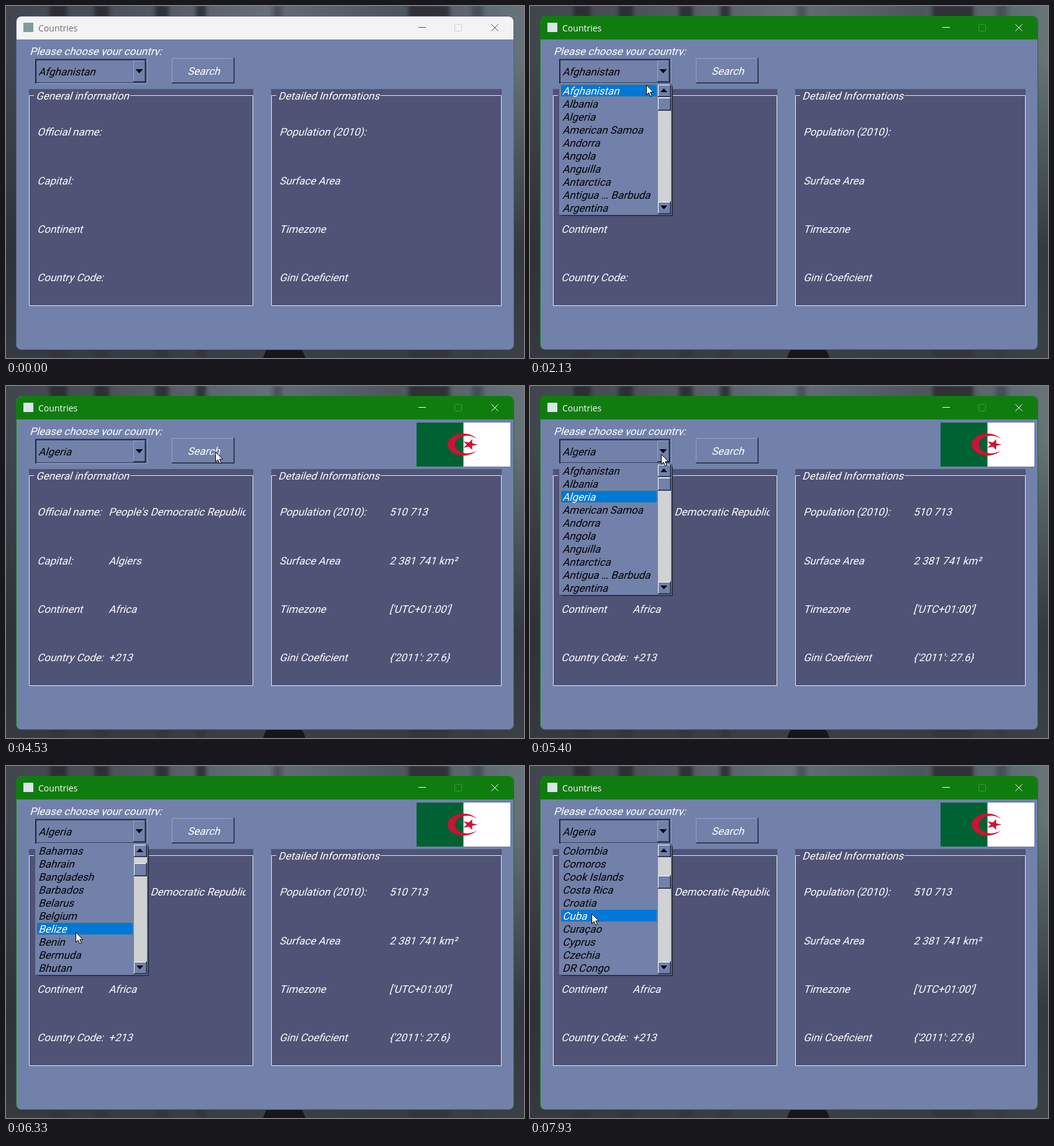
Write an HTML page that moves like this. It is 834 by 568 pixels and loops after 8 s.

```html
<!DOCTYPE html>
<html lang="en">
<head>
<meta charset="utf-8">
<title>Countries</title>
<style>
  html, body { margin: 0; width: 100%; height: 100%; overflow: hidden; background: #3a3d45; }
  svg { display: block; width: 834px; height: 568px; }
  text { font: 17px Roboto, sans-serif; fill: #fff; white-space: pre; }
  .dark { fill: #000; }
  .caption { font: 14px "Open Sans", "Noto Sans", sans-serif; fill: var(--title); }
  #app { --bar: #f3f3f3; --title: #6f6f6f; --control: #555; --off: #cfcfcf; --edge: #5a6180; --icon: #7f9c9d; }
  #app.active { --bar: #107c10; --title: #fff; --control: #fff; --off: #409640; --edge: #107c10; --icon: #dce6ea; }
  .line { fill: none; stroke-width: 1; }
</style>
</head>
<body>
<svg id="app" viewBox="0 0 834 568">
  <defs>
    <linearGradient id="fog">
      <stop offset="0" stop-color="#41454d"/><stop offset=".2" stop-color="#4b5159"/>
      <stop offset=".5" stop-color="#656f78"/><stop offset=".75" stop-color="#4d555d"/>
      <stop offset="1" stop-color="#66747a"/>
    </linearGradient>
    <linearGradient id="ground" x2="0" y2="1">
      <stop offset=".15" stop-color="#2c2e35" stop-opacity="0"/>
      <stop offset=".7" stop-color="#2c2e35" stop-opacity=".85"/>
      <stop offset="1" stop-color="#34373d" stop-opacity=".85"/>
    </linearGradient>
    <filter id="soft"><feGaussianBlur stdDeviation="3 1"/></filter>
    <pattern id="checker" width="2" height="2" patternUnits="userSpaceOnUse">
      <path fill="#fff" d="M0 0h2v2h-2z"/><path fill="#a2a4a8" d="M0 0h1v1h-1zM1 1h1v1h-1z"/>
    </pattern>
    <clipPath id="promptClip"><path d="M30 60h230v20h-230z"/></clipPath>
    <clipPath id="nameClip"><path d="M160 185h226v35h-226z"/></clipPath>
    <clipPath id="listClip"><path d="M49 126h156v210h-156z"/></clipPath>
  </defs>

  <rect width="834" height="568" fill="url(#fog)"/>
  <g filter="url(#soft)" fill="#25272e">
    <path d="M70 0h28v568h-28zM142 0h24v568h-24zM240 0h22v568h-22zM306 0h16v568h-16zM648 0h66v568h-66z" opacity=".8"/>
    <path d="M430 0h14v568h-14zM750 0h18v568h-18z" opacity=".4"/>
  </g>
  <rect width="834" height="568" fill="url(#ground)"/>
  <path d="M414 568q4-16 14-20h38q12 4 16 20z" fill="#14161a"/>

  <rect x="16.5" y="16.5" width="801" height="538" rx="8" fill="#7181aa"/>
  <path d="M17 54v-29q0-8 8-8h784q8 0 8 8v29z" fill="var(--bar)"/>
  <rect x="16.5" y="16.5" width="801" height="538" rx="8" class="line" stroke="var(--edge)"/>
  <rect x="28" y="27" width="16" height="15" fill="var(--icon)"/>
  <text class="caption" x="52" y="41">Countries</text>
  <g class="line" stroke="var(--control)">
    <path d="M664 34.5h12M781.5 29.5l11 11m0-11l-11 11"/>
    <rect x="722.5" y="29.5" width="11" height="11" rx="1" stroke="var(--off)"/>
  </g>

  <g id="panels"></g>

  <g class="line">
    <path d="M227.5 85v40.5h-180" stroke="#8c9ac0"/>
    <path d="M48 125v-38.5h178" stroke="#20263a" stroke-width="2"/>
    <path d="M49 123.5h176.5v-36" stroke="#39425f"/>
  </g>
  <rect id="picked" x="50" y="88" width="154" height="35" fill="#0078d7"/>
  <g id="frames" class="line"></g>
  <path d="M208.5 102h12l-6 6.500z"/>

  <g id="labels"></g>
  <g id="results">
    <svg x="661" y="59" width="151" height="71" viewBox="0 0 900 600" preserveAspectRatio="none">
      <path fill="#fff" d="M0 0h900v600H0z"/><path fill="#006233" d="M0 0h450v600H0z"/>
      <path fill="#d21034" d="M580 225a150 150 0 1 0 0 150 120 120 0 1 1 0-150M586 300L450 256 534 371V229L450 344z"/>
    </svg>
  </g>

  <g id="popup">
    <path d="M52 130h178v209h-178z" fill="#20232f" opacity=".8"/>
    <rect x="47" y="125" width="181" height="212" fill="#7181aa"/>
    <path d="M228.500 126v211.500h-180" class="line" stroke="#333950"/>
    <rect id="hover" x="49.500" width="155" height="20" fill="#0078d7" stroke="#d98a3a" stroke-dasharray="1 1"/>
    <g id="rows" clip-path="url(#listClip)"></g>
    <rect x="206" y="127" width="21" height="209" fill="url(#checker)"/>
    <g id="bar"></g>
    <g id="thumb"></g>
    <path d="M210 139h11l-5.500-6zM210 322h11l-5.500 6z"/>
  </g>

  <path id="cursor" d="M.5 .5v16l3.700-3.500 2.500 5.800 2.600-1.100-2.500-5.700h5z" fill="#fff" stroke="#000"/>
</svg>

<script>
const $ = id => document.getElementById(id);
const LOOP = 8000, STEP = 1000 / 15, ROW = 21, VISIBLE = 10;
const countries = ("Afghanistan,Albania,Algeria,American Samoa,Andorra,Angola,Anguilla,Antarctica," +
  "Antigua … Barbuda,Argentina,Armenia,Aruba,Australia,Austria,Azerbaijan,Bahamas,Bahrain," +
  "Bangladesh,Barbados,Belarus,Belgium,Belize,Benin,Bermuda,Bhutan,Bolivia,Bosnia an…zegovina," +
  "Botswana,Bouvet Island,Brazil,British I… Territory,British V…n Islands,Brunei,Bulgaria," +
  "Burkina Faso,Burundi,Cambodia,Cameroon,Canada,Cape Verde,Caribbea…herlands,Cayman Islands," +
  "Central A… Republic,Chad,Chile,China,Christmas Island,Cocos (K… Islands,Colombia,Comoros," +
  "Cook Islands,Costa Rica,Croatia,Cuba,Curaçao,Cyprus,Czechia,DR Congo").split(",");

function add(parent, markup) {
  parent.insertAdjacentHTML("beforeend", markup);
  return parent.lastElementChild;
}

function label(parent, x, y, content = "", clip = "") {
  const box = add(parent, `<g ${clip && `clip-path="url(#${clip})"`}>
    <text transform="translate(${x} ${y}) skewX(-17)"></text></g>`);
  const text = box.querySelector("text");
  text.textContent = content;
  return text;
}

function bevel(parent, x, y, w, h, light = "#93a2c9", fill = "#7181aa") {
  add(parent, `<g><rect x="${x}" y="${y}" width="${w}" height="${h}" fill="${fill}"/>
    <path d="M${x + .5} ${y + h}v${.5 - h}h${w}" fill="none" stroke="${light}"/>
    <path d="M${x} ${y + h - .75}h${w - .75}v${-h}" fill="none" stroke="#20263a" stroke-width="1.5"/></g>`);
}

function panel(x, w, title, gapEnd) {
  const right = x + w - .5;
  add($("panels"), `<g><rect x="${x}" y="134" width="${w}" height="350" fill="#4f5376"/>
    <path class="line" stroke="#e8eaf2" d="M${x + 8} 144.500H${x + .5}V483.500H${right}V144.500H${gapEnd}"/></g>`);
  label($("labels"), x + 11, 151, title);
}

const lines = [209, 288, 366, 444];
const column = (parent, x, texts) =>
  texts.forEach((s, i) => label(parent, x, lines[i], s, x === 165 && !i ? "nameClip" : ""));

panel(37, 361, "General information", 200);
panel(427, 371, "Detailed Informations", 603);
bevel($("frames"), 205, 88, 20, 35);
bevel($("frames"), 267, 84, 101, 41);
label($("labels"), 38, 79, "Please choose your country:", "promptClip");
label($("labels"), 292, 111, "Search");
column($("labels"), 50, ["Official name:", "Capital:", "Continent", "Country Code:"]);
column($("labels"), 440, ["Population (2010):", "Surface Area", "Timezone", "Gini Coeficient"]);
column($("results"), 165, ["People's Democratic Republic of Algeria", "Algiers", "Africa", "+213"]);
column($("results"), 617, ["510 713", "2 381 741 km²", "['UTC+01:00']", "{'2011': 27.6}"]);
bevel($("bar"), 206, 127, 21, 20, "#fff");
bevel($("bar"), 206, 316, 21, 20, "#fff");
bevel($("thumb"), 206, 148, 21, 21, "#fff");

const chosen = label($("labels"), 52, 112);
chosen.classList.add("dark");
const rows = Array.from({ length: VISIBLE }, (_, i) => label($("rows"), 52, 143 + i * ROW));

// Pointer stops: time, x, y
const path = [
  [500, 440, 580], [1300, 216, 112], [1600, 214, 106], [2070, 187, 127], [2200, 187, 127],
  [2600, 152, 180], [2800, 152, 180], [3400, 324, 142], [3700, 337, 106], [4600, 337, 106],
  [5130, 214, 106], [5330, 214, 106], [5800, 170, 181], [5930, 170, 181], [6300, 112, 268],
  [6700, 109, 271], [7100, 109, 271], [7750, 99, 238], [8000, 99, 238]
];

function pointerAt(t) {
  const next = path.findIndex(p => p[0] > t);
  if (next < 1) return path[0].slice(1);
  const [t0, x0, y0] = path[next - 1], [t1, x1, y1] = path[next];
  const u = (t - t0) / (t1 - t0), k = u * u * (3 - 2 * u);
  return [Math.round(x0 + (x1 - x0) * k), Math.round(y0 + (y1 - y0) * k)];
}

const clamp = (v, lo, hi) => Math.min(hi, Math.max(lo, v));
const notches = (t, start, every, count) => clamp(Math.floor((t - start) / every) + 1, 0, count);
const show = (id, on) => $(id).style.display = on ? "" : "none";

function render(t) {
  const [x, y] = pointerAt(t);
  const current = t < 2730 ? 0 : 2;
  const open = (t >= 1600 && t < 2730) || t >= 5250;
  const first = 3 * (notches(t, 6070, 62, 13) + notches(t, 7200, 160, 3));

  $("app").classList.toggle("active", t >= 1580);
  show("picked", t >= 2730 && t < 3850);
  show("results", t >= 4200);
  show("popup", open);
  chosen.textContent = countries[current];
  $("cursor").setAttribute("transform", `translate(${x} ${y})`);
  if (!open) return;

  const over = y >= 127 && x < 206;
  const row = over ? clamp(Math.floor((y - 127) / ROW), 0, VISIBLE - 1) : current - first;
  $("hover").setAttribute("y", 127.5 + row * ROW - 1);
  rows.forEach((text, i) => {
    text.textContent = countries[first + i];
    text.classList.toggle("dark", i !== row);
  });
  $("thumb").setAttribute("transform", `translate(0 ${Math.round(first * .61)})`);
}

const origin = performance.now();
function tick() {
  const t = (performance.now() - origin) % LOOP;
  render(Math.floor((t + 5) / STEP) * STEP);
  requestAnimationFrame(tick);
}
tick();
</script>
</body>
</html>
```
